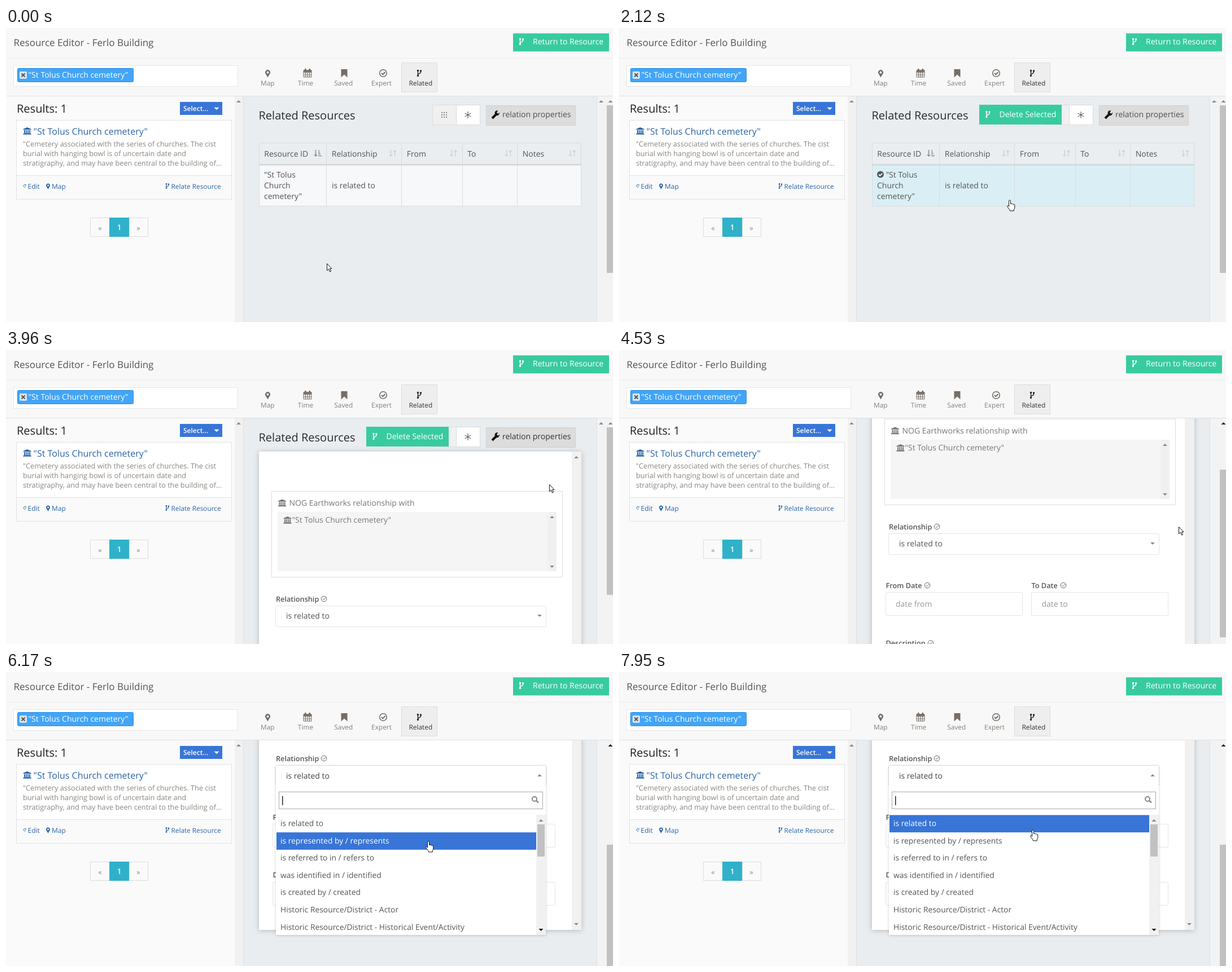
Recreate the animation shown at these times as an HTML page. Size 1075 by 521 pixels, loop 8000 ms.

```html
<!DOCTYPE html>
<html lang="en">
<head>
<meta charset="utf-8">
<title>Resource Editor</title>
<style>
  html, body { margin: 0; width: 100%; height: 100%; overflow: hidden; background: #f8f8f8; }
  svg { display: block; font-family: "Open Sans", sans-serif; text-rendering: geometricPrecision; }
  .panel { filter: drop-shadow(0 1px 5px rgba(0, 0, 0, .22)); }
</style>
</head>
<body>
<svg id="stage" width="1075" height="521" viewBox="0 0 1075 521"></svg>
<script>
const LOOP = 8000, MAX_SCROLL = 288, ROW = 30.7;
const GREEN = '#38cba0', BLUE = '#3875d7', LINK = '#2a64a8', WARM = '#857f78', INK = '#555';

// Drawing helpers, each returning SVG markup
const rect = (x, y, w, h, fill, attrs = '') =>
  `<rect x="${x}" y="${y}" width="${w}" height="${h}" fill="${fill}" ${attrs}/>`;
const box = (x, y, w, h, fill, stroke, attrs = '') =>
  rect(x + .5, y + .5, w - 1, h - 1, fill, `stroke="${stroke}" ${attrs}`);
const text = (x, y, str, size, fill, attrs = '') =>
  `<text x="${x}" y="${y}" font-size="${size}" fill="${fill}" ${attrs}>${str}</text>`;
const label = (x, y, str, size, fill, attrs = '') => text(x, y, str, size, fill, `text-anchor="middle" ${attrs}`);
const bold = (x, y, str, size, fill) => text(x, y, str, size, fill, 'font-weight="600"');
const tri = (x, y, dir, fill = '#888', r = 4) =>
  `<path d="M${x - r} ${y - dir * r / 2}h${2 * r}l${-r} ${dir * r}z" fill="${fill}"/>`;
const group = (id, body) => `<g id="${id}">${body}</g>`;

const solid = d => `<path d="${d}" fill="currentColor"/>`;
const line = (d, w = 1.5) => `<path d="${d}" fill="none" stroke="currentColor" stroke-width="${w}"/>`;
const ring = (r, w) => `<circle r="${r}" fill="none" stroke="currentColor" stroke-width="${w}"/>`;
const icons = {
  fork: line('M-2.5-4V4M2.5-3V-2Q2.5 0-2.5 2') +
    [[-2.5, -4.5], [2.5, -4], [-2.5, 4.5]].map(([x, y]) => `<circle cx="${x}" cy="${y}" r="1.7" fill="currentColor"/>`).join(''),
  bank: solid('M0-6.5L7-3.5V-2.3H-7V-3.5zM-5.5-1.5h2v5h-2zM-2.4-1.5h1.8v5h-1.8zM.7-1.5h1.8v5H.7zM3.6-1.5h2v5h-2zM-6 3.8H6.2V4.8H7.2V6.2H-7.2V4.8H-6z'),
  pin: solid('M0 7.5L-3.5 1.5A4.5 4.5 0 1 1 3.5 1.5zM0-3.3a2 2 0 1 0 .01 0z'),
  calendar: line('M-7-5H7V7H-7zM-7-1H7M-7 3H7M-3.5-2V7M0-2V7M3.5-2V7', 1) + solid('M-7-5.5H7V-2H-7zM-5-8h2.5v3H-5zM2.5-8H5v3H2.5z'),
  bookmark: solid('M-5.5-7H5.5V7.5L0 2.5-5.5 7.5z'),
  check: ring(6.3, 1.6) + line('M-3 0L-.7 2.4 3.5-2', 2),
  tick: ring(4.8, 1) + line('M-2.4 0L-.6 1.8 4-3', 1),
  wrench: line('M-6 6L2-2', 4) + solid('M7.5-4.5L4.5-2 2-4.5 4.5-7.5Q0-8.5-1.3-4.5-1.8-1 1 1 6 2.5 7.5-4.5z'),
  star: line('M0-6V6M-5.5-3L5.5 3M-5.5 3L5.5-3', 1),
  dots: [-4, 0, 4].map(x => [-4, 0, 4].map(y => solid(`M${x - 1} ${y - 1}h2v2h-2z`)).join('')).join(''),
  sort: line('M-3.5-6V5M-6 2.5L-3.5 5-1 2.5M3.5 6V-5M1-2.5L3.5-5 6-2.5'),
  sorted: line('M-3.5-6V5M-6 2.5L-3.5 5-1 2.5M1-5h2M1-2h3M1 1h4M1 4.5h6'),
  reload: line('M2.3-1.8A2.6 2.6 0 1 0 2.5 1M2.5-3.5V-1.3H.5', 1),
  lens: ring(4, 2) + line('M3 3L7 6.5', 2.4)
};
const icon = (name, x, y, color, scale = 1) =>
  `<g transform="translate(${x} ${y}) scale(${scale})" color="${color}">${icons[name]}</g>`;

const PLACE = '"St Tolus Church cemetery"';
const options = ['is related to', 'is represented by / represents', 'is referred to in / refers to',
  'was identified in / identified', 'is created by / created', 'Historic Resource/District - Actor',
  'Historic Resource/District - Historical Event/Activity'];

function header() {
  // name, icon, label centre, icon centre
  const tools = [['Map', 'pin', 463.3, 463.5], ['Time', 'calendar', 530.5, 534], ['Saved', 'bookmark', 597.8, 599],
    ['Expert', 'check', 665, 668], ['Related', 'fork', 734.3, 732]];
  return rect(0, 0, 1075, 121, '#f8f8f8') + rect(0, 53, 1075, 1, '#ebebeb') + rect(0, 120, 1075, 1, '#e0e0e0') +
    text(13.5, 32, 'Resource Editor - Ferlo Building', 17, INK) +
    rect(898, 9.5, 170, 32, GREEN) + icon('fork', 913, 24, '#fff') + text(933, 29, 'Return to Resource', 14, '#fff') +
    box(13, 66, 398, 38, '#fff', '#e6e6e6') +
    box(20, 71, 206, 25, '#42a5f7', '#2f8fe0', 'rx="2"') +
    rect(24, 77, 13, 13, '#d6e4f0', 'rx="2"') +
    `<path d="M27.5 80.5l6 6m0-6l-6 6" stroke="#555" stroke-width="2"/>` +
    text(39.5, 87.5, PLACE, 14, '#fff') +
    box(700, 61, 64, 53, '#eee', '#dcdcdc') +
    tools.map(([name, glyph, x, iconX]) => {
      const active = name === 'Related';
      return icon(glyph, iconX, 80, active ? '#222' : '#756d66') + label(x, 102, name, 11.9, active ? '#333' : WARM);
    }).join('');
}

function results() {
  return rect(0, 121, 405, 400, '#fafafa') + rect(405, 121, 15, 400, '#f1f1f1') + tri(412, 130, -1) +
    text(19, 150, 'Results: 1', 20, '#222') +
    rect(308, 131, 75, 23, BLUE) + bold(314, 147, 'Select...', 12, '#fff') + tri(373, 143, 1, '#fff', 4.5) +
    box(18, 163, 382, 141, '#fff', '#e2e2e2') + box(18, 261, 382, 43, '#fafafa', '#e2e2e2') +
    icon('bank', 37.5, 182.5, LINK) + text(48.5, 189, PLACE, 16, LINK) +
    ['"Cemetery associated with the series of churches. The cist',
      'burial with hanging bowl is of uncertain date and',
      'stratigraphy, and may have been central to the building of...']
      .map((s, i) => text(30, 209.5 + 17 * i, s, 12.72, '#8b8680')).join('') +
    icon('reload', 33, 280, LINK, .85) + text(38.5, 284.5, 'Edit', 12, LINK) +
    icon('pin', 74.5, 280, LINK, .75) + text(81, 284.5, 'Map', 12, LINK) +
    icon('fork', 286, 280, LINK, .8) + text(292.5, 284.5, 'Relate Resource', 11.8, LINK) +
    box(149, 336, 35, 34, '#fafafa', '#ddd') + box(218, 336, 34, 34, '#fafafa', '#ddd') +
    rect(183, 336, 35, 34, '#2fb1ca') + label(166.5, 359, '«', 13, '#888') +
    label(200.5, 358, '1', 13.5, '#fff', 'font-weight="600"') + label(234.5, 359, '»', 13, '#888');
}

function table() {
  const edges = [448, 567.5, 700.5, 808, 905.5, 1018.5];
  const heads = ['Resource ID', 'Relationship', 'From', 'To', 'Notes'];
  return text(447.5, 162, 'Related Resources', 20, '#2b2b2b') +
    box(755, 136, 43, 36, '#f0f0f0', '#dcdcdc') + icon('dots', 776, 154, '#888') +
    box(797, 136, 43, 36, '#fff', '#dcdcdc') + icon('star', 818, 154, '#444') +
    box(850, 137, 159, 36, '#dcdcdc', '#d0d0d0') + icon('wrench', 867, 154, '#111') +
    text(879, 158, 'relation properties', 14, '#505050', 'id="propsText"') +
    rect(448, 204, 570, 38, '#ebeef0') + rect(448, 243, 570, 73, '#f7f8fa', 'id="row"') +
    edges.map(x => rect(Math.floor(x), 204, 1, 112, '#d9dde0')).join('') +
    rect(448, 203.5, 571, 1, '#d9dde0') + rect(448, 241, 571, 2.5, '#d3d6d8') + rect(448, 315, 571, 1, '#d9dde0') +
    heads.map((s, i) => text(edges[i] + 9.3, 227.5, s, 14, INK) +
      icon(i ? 'sort' : 'sorted', edges[i + 1] - 15.5, 222, i ? '#cfd2d4' : '#888')).join('') +
    text(457, 265, '"St Tolus', 14, INK, 'id="firstLine"') + text(457, 284, 'Church', 14, INK) +
    text(457, 303, 'cemetery"', 14, INK) + text(577, 284, 'is related to', 14, INK) +
    group('selected', '<circle cx="463" cy="259.5" r="6" fill="#555"/>' +
      '<path d="M460 259.5l2.3 2.3 4-4.2" fill="none" stroke="#fff" stroke-width="1.8"/>' +
      rect(638, 136, 146, 35, GREEN) + icon('fork', 653.5, 153, '#fff') +
      text(673.5, 158, 'Delete Selected', 14, '#fff'));
}

function form() {
  const field = (x, y, name, tickX) => bold(x, y, name, 12.7, INK) + icon('tick', tickX, y - 4.5, '#666');
  const input = (x, y, w) => box(x, y, w, 42, '#fff', '#e5e5e5', 'rx="2"');
  return rect(448, 180, 571, 565, '#fff', 'class="panel"') + rect(1002, 180, 17, 565, '#f1f1f1') +
    tri(1010, 190, -1) + tri(1010, 735, 1) +
    box(470, 250, 516, 153, '#fff', '#ddd') +
    icon('bank', 489, 271, '#777') + text(501.5, 276, 'NOG Earthworks relationship with', 14, '#777') +
    rect(481, 287, 494, 105, '#f5f5f5') + rect(959, 287, 16, 105, '#f0f0f0') +
    tri(967, 296, -1) + tri(967, 384, 1) +
    icon('bank', 498.5, 301.5, '#777') + text(506.5, 306, PLACE, 13.9, '#777') +
    field(478, 445.5, 'Relationship', 563) +
    box(477, 453, 480, 38, '#fff', '#e5e5e5', 'rx="2"') + text(496, 476, 'is related to', 14, INK) +
    tri(945, 471, 1, '#888', 3.8) +
    field(472.5, 549.5, 'From Date', 546) + input(472, 557, 243) + text(490, 583, 'date from', 14, '#999') +
    field(730.5, 549.5, 'To Date', 787) + input(730, 557, 243) + text(748.5, 583, 'date to', 14, '#999') +
    field(472.5, 652, 'Description', 552) + input(472, 660, 501);
}

function dropdown() {
  return rect(478, 166, 478, 300, '#fff', 'style="filter:drop-shadow(0 1px 2px rgba(0,0,0,.18))"') +
    text(496, 188.5, 'is related to', 14, '#444') + tri(945, 183, -1, '#888', 3.8) +
    box(483, 212, 468, 31, '#fff', '#aaa') + rect(489, 220, 1.5, 16, '#222') + icon('lens', 936, 225, '#888') +
    rect(479, 0, 460, ROW, BLUE, 'id="highlight"') +
    group('options', options.map((s, i) => text(486, 273 + 30.6 * i, s, 13.85, INK)).join('')) +
    rect(939, 253, 17, 213, '#f1f1f1') + rect(941, 270, 13, 57, '#c1c1c1') +
    tri(947.5, 263, -1) + tri(947.5, 457, 1, '#111');
}

const HAND = 'M-1.5 10V1.5a1.5 1.5 0 0 1 3 0V6.5q2-1 2.7.5 2-.9 2.6.6 2-.5 2 1.4V13q0 2-1.5 3.8V19H.2v-1.6L-4 12q-1-2 .3-2.5 1.2 0 2.2 1.8z';
const ARROW = 'M.5.5V12.8l2.9-2.7 2.1 5 2-.9-2-4.8H9z';

stage.innerHTML =
  group('page', rect(421, 121, 625, 800, '#e9edf0') + rect(1046, 121, 17, 800, '#f1f3f4') +
    rect(420, 121, 1, 800, '#dde0e2') + rect(1046, 121, 1, 800, '#dfe2e4') + tri(1054, 130, -1) +
    table() + group('form', form())) +
  group('dropdown', dropdown()) +
  rect(1063, 121, 12, 400, '#f3f3f3') + rect(1064, 137, 11, 297, '#c1c1c1', 'id="thumb"') +
  group('outerArrow', tri(1070.5, 130, -1, 'currentColor')) + results() + header() +
  '<path id="cursor" fill="#fff" stroke="#111" stroke-linejoin="round"/>';

const $ = id => document.getElementById(id);
const set = (id, name, value) => $(id).setAttribute(name, value);
const show = (id, on) => set(id, 'visibility', on ? 'visible' : 'hidden');

// Each move: first change, last change, number of steps, points along the way
const scrolling = [4300, 4830, 8, [[0], [128], [MAX_SCROLL]]];
const moves = [
  [460, 1080, 9, [[568, 417], [562, 345], [549, 296]]],
  [1970, 2720, 11, [[549, 296], [680, 306], [810, 290], [900, 225], [931, 166]]],
  [2790, 2850, 2, [[931, 166], [933, 162]]],
  [3780, 4150, 6, [[933, 162], [991, 313]]],
  [4830, 5290, 7, [[991, 313], [752, 196]]],
  [5860, 6600, 11, [[752, 196], [748, 310], [751, 401]]],
  [6760, 6761, 1, [[751, 401], [751, 402]]],
  [7080, 7081, 1, [[751, 402], [751, 403]]],
  [7220, 7950, 11, [[751, 403], [741, 366], [738, 337], [735, 308], [733, 280]]]
];

function position(t, [start, end, steps, points]) {
  const step = Math.floor((t - start) / (end - start) * (steps - 1) + 1e-6) + 1;
  const s = Math.min(1, Math.max(0, step / steps)) * (points.length - 1);
  const i = Math.min(Math.floor(s), points.length - 2);
  return points[i].map((v, k) => v + (points[i + 1][k] - v) * (s - i));
}

function render(t) {
  const move = moves.filter(m => t >= m[0]).pop();
  const [x, y] = move ? position(t, move) : moves[0][3][0];
  const scroll = t < scrolling[0] ? 0 : position(t, scrolling)[0];
  const over = (x0, y0, x1, y1) => x >= x0 && x <= x1 && y >= y0 && y <= y1;
  const opened = t >= 3160, listOpen = t >= 5470, selected = t >= 1510;

  set('page', 'transform', `translate(0 ${-scroll})`);
  set('thumb', 'y', 137 + scroll * 169 / MAX_SCROLL);
  set('outerArrow', 'color', scroll ? '#111' : '#888');
  set('row', 'fill', !opened && over(448, 243, 1018, 316) ? '#daeff5' : '#f7f8fa');
  set('firstLine', 'x', selected ? 472.5 : 457);
  set('propsText', 'fill', t < 2790 ? '#505050' : t < 2850 ? '#424242' : '#333');
  show('selected', selected);
  show('form', opened);
  show('dropdown', listOpen);

  const active = t < 5860 ? 0 : Math.max(0, Math.floor((y + 3 - 253.5) / ROW));
  set('highlight', 'y', 253.5 + ROW * active);
  [...$('options').children].forEach((node, i) => node.setAttribute('fill', i === active ? '#fff' : INK));

  const hand = t < 4300 && over(850, 137, 1009, 172) || !opened && over(448, 204, 1018, 316) ||
    t > 4830 && over(478, 165, 956, 466);
  set('cursor', 'd', hand ? HAND : ARROW);
  set('cursor', 'transform', `translate(${Math.round(x)} ${Math.round(y)})`);
}

const begin = performance.now();
(function tick() {
  render((performance.now() - begin) % LOOP);
  requestAnimationFrame(tick);
})();
</script>
</body>
</html>
```
